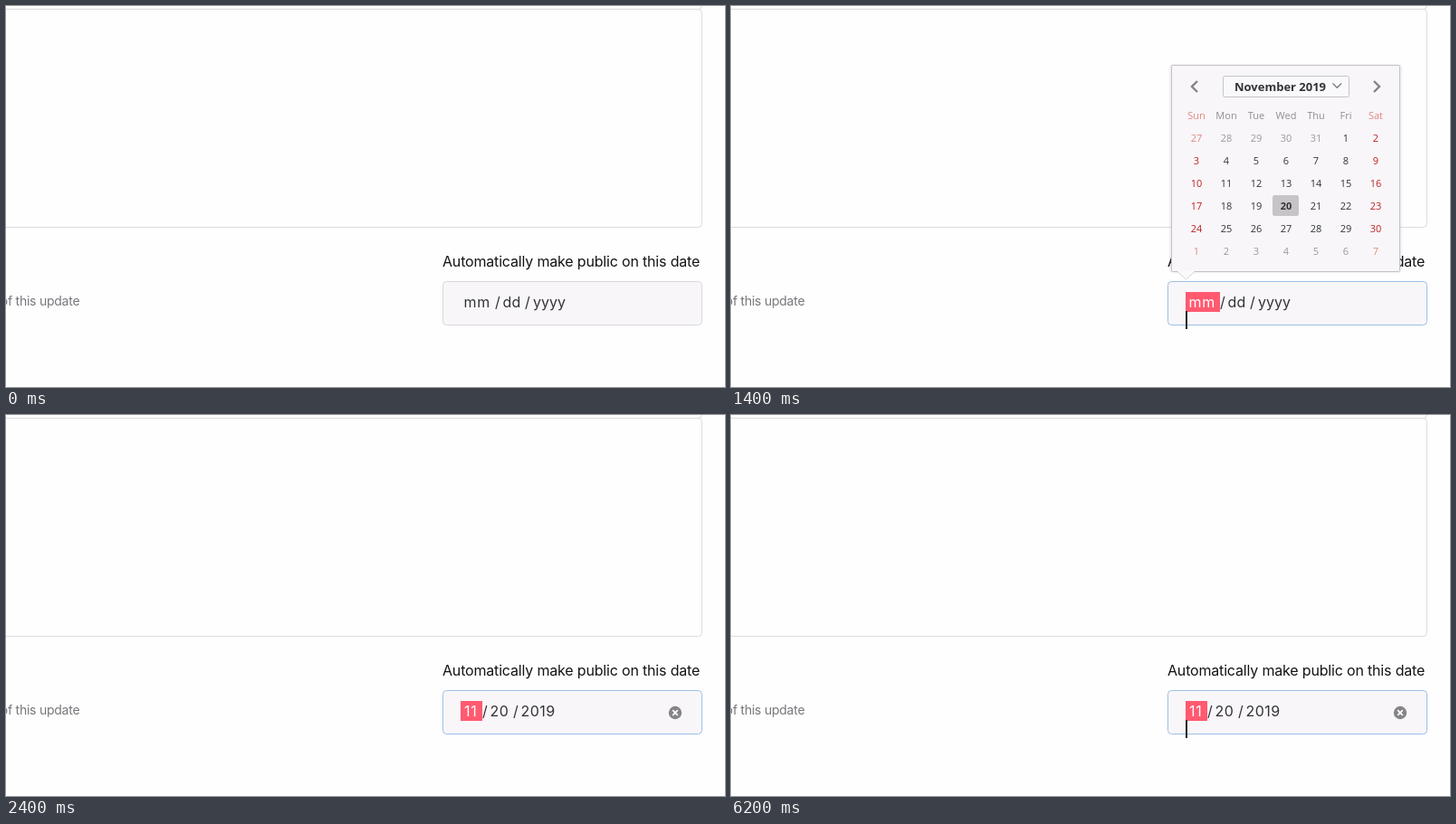
These frames come from a looping animation (794 px wide and 421 px high, 6300 ms). An HTML page:

```html
<!DOCTYPE html>
<html lang="en">
<head>
<meta charset="utf-8">
<title>Date picker</title>
<style>
  html, body { margin: 0; width: 100%; height: 100%; overflow: hidden; background: #fefefe; }
  svg { display: block; }
  .page { font-family: Inter, sans-serif; font-size: 16px; }
  .calendar { font-family: "Open Sans", "Noto Sans", sans-serif; font-size: 11px; text-anchor: middle; }
  .line { fill: none; stroke-linejoin: miter; }
</style>
</head>
<body>
<svg id="stage" width="794" height="421" viewBox="0 0 794 421"></svg>
<script>
const LOOP = 6300;
const PINK = '#ff5a70';
const PANEL = '#f8f6f9';
const INK = '#333335';
const HOVER = '#e0dee1';
const TODAY = '#c6c4c7';
const stage = document.getElementById('stage');

function add(parent, tag, attrs, text) {
  const node = document.createElementNS('http://www.w3.org/2000/svg', tag);
  for (const key in attrs) node.setAttribute(key, attrs[key]);
  if (text !== undefined) node.textContent = text;
  parent.appendChild(node);
  return node;
}
const group = (parent, name) => add(parent, 'g', name ? { class: name } : {});
const box = (parent, x, y, width, height, rx, attrs) =>
  add(parent, 'rect', { x, y, width, height, rx, ...attrs });
const label = (parent, x, y, text, attrs) => add(parent, 'text', { x, y, ...attrs }, text);
const line = (parent, d, stroke, width) =>
  add(parent, 'path', { class: 'line', d, stroke, 'stroke-width': width });
const show = (node, on) => node.setAttribute('visibility', on ? 'visible' : 'hidden');

// Page and date field
const page = group(stage, 'page');
const frame = { fill: 'none', stroke: '#dcdbdf' };
box(page, -20.5, -60.5, 789, 64, 4, frame);
box(page, -20.5, 3.5, 789, 241, 4, frame);
label(page, 482, 288, 'Automatically make public on this date',
  { fill: '#141416', 'letter-spacing': '-0.011em' });
label(page, 81.3, 331, 'of this update',
  { fill: '#77767b', 'font-size': 14, 'text-anchor': 'end', 'letter-spacing': '-0.018em' });
const field = box(page, 482.5, 304.5, 286, 48, 4, { fill: PANEL });
const mark = box(page, 502, 316, 38, 22, 0, { fill: PINK });

// Each piece: x, text, letter spacing
function dateText(pieces) {
  const g = group(page);
  const nodes = pieces.map(([x, text, spacing]) =>
    label(g, x, 333, text, { fill: INK, 'letter-spacing': spacing }));
  return { g, month: nodes[0] };
}
const blank = dateText([[505.5, 'mm', 0.8], [540, '/', 0], [548.5, 'dd', 0.2], [573, '/', 0], [582, 'yyyy', 0]]);
const filled = dateText([[506, '11', 0.8], [526, '/', 0], [534.5, '20', 0.5], [560, '/', 0], [568.5, '2019', 0.5]]);

const clear = group(page);
add(clear, 'circle', { cx: 739, cy: 329, r: 7.2, fill: '#858488' });
line(clear, 'M736.2 326.2l5.6 5.6m0-5.6l-5.6 5.6', '#fff', 1.7);
const caret = box(page, 502, 337, 2, 20, 0, { fill: '#222224' });

// Calendar popup
const popup = group(stage, 'calendar');
for (let i = 3; i > 0; i--) {
  box(popup, 486 - i, 65.5 - i / 2, 253 + 2 * i, 228 + i * 1.3, 2 + i, { fill: '#000', opacity: 0.02 });
}
box(popup, 486.5, 65.5, 252, 228, 1, { fill: PANEL, stroke: '#c3c1c5' });
add(popup, 'path', { d: 'M493 293L502.5 302L512 293Z', fill: '#fbfafb' });
line(popup, 'M493 293.5L502.5 302L512 293.5', '#d6d4d8', 1);
line(popup, 'M515 83l-6 6l6 6', '#858387', 2.4);
line(popup, 'M710 83l6 6l-6 6', '#858387', 2.4);
box(popup, 543.5, 77.5, 139, 23, 2, { fill: '#f9f8fa', stroke: '#c6c4c8' });
label(popup, 606.5, 94, 'November 2019', { fill: INK, 'font-size': 13, 'font-weight': 700 });
line(popup, 'M664.5 85.5l4.8 4.8l4.8-4.8', '#7b797d', 1.3);

const column = i => 514 + 33 * i;
const weekend = i => i % 7 === 0 || i % 7 === 6;
'Sun Mon Tue Wed Thu Fri Sat'.split(' ').forEach((name, i) =>
  label(popup, column(i), 125, name, { fill: weekend(i) ? '#df877d' : '#8f8d92' }));

const days = {};
for (let i = 0; i < 42; i++) {
  const offset = i - 4;
  const inside = offset >= 1 && offset <= 30;
  const day = inside ? offset : offset < 1 ? offset + 31 : offset - 30;
  const x = column(i % 7);
  const y = 146 + 25 * Math.floor(i / 7);
  const fill = weekend(i) ? (inside ? '#bd2222' : '#e0897f') : (inside ? INK : '#99979c');
  const cell = box(popup, x - 15, y - 12, 29, 23, 2.5, { fill: 'none' });
  const text = label(popup, x, y + 4, day, { fill, 'font-weight': day === 20 ? 700 : 400 });
  if (inside) days[day] = { cell, text };
}

function draw(t) {
  const focused = t >= 1000;
  const chosen = t >= 2400;
  const pressed = t >= 2300;
  field.setAttribute('stroke', focused ? '#9cc0e6' : '#d9d7dc');
  show(mark, focused);
  mark.setAttribute('width', chosen ? 24 : 38);
  blank.month.setAttribute('fill', focused ? '#fff' : INK);
  filled.month.setAttribute('fill', '#fff');
  show(blank.g, !chosen);
  show(filled.g, chosen);
  show(clear, chosen);
  show(caret, (t >= 1300 && t < 2400) || (t >= 3600 && t < 4800) || t >= 6200);
  show(popup, t >= 1400 && !chosen);

  days[25].cell.setAttribute('fill', t >= 1700 && t < 1800 ? HOVER : 'none');
  days[19].cell.setAttribute('fill', t >= 1800 && t < 2000 ? HOVER : 'none');
  days[20].cell.setAttribute('fill', pressed ? PINK : t >= 2000 ? HOVER : TODAY);
  days[20].text.setAttribute('fill', pressed ? '#fff' : INK);
}

const start = performance.now();
function tick() {
  draw((performance.now() - start) % LOOP);
  requestAnimationFrame(tick);
}
tick();
</script>
</body>
</html>
```
